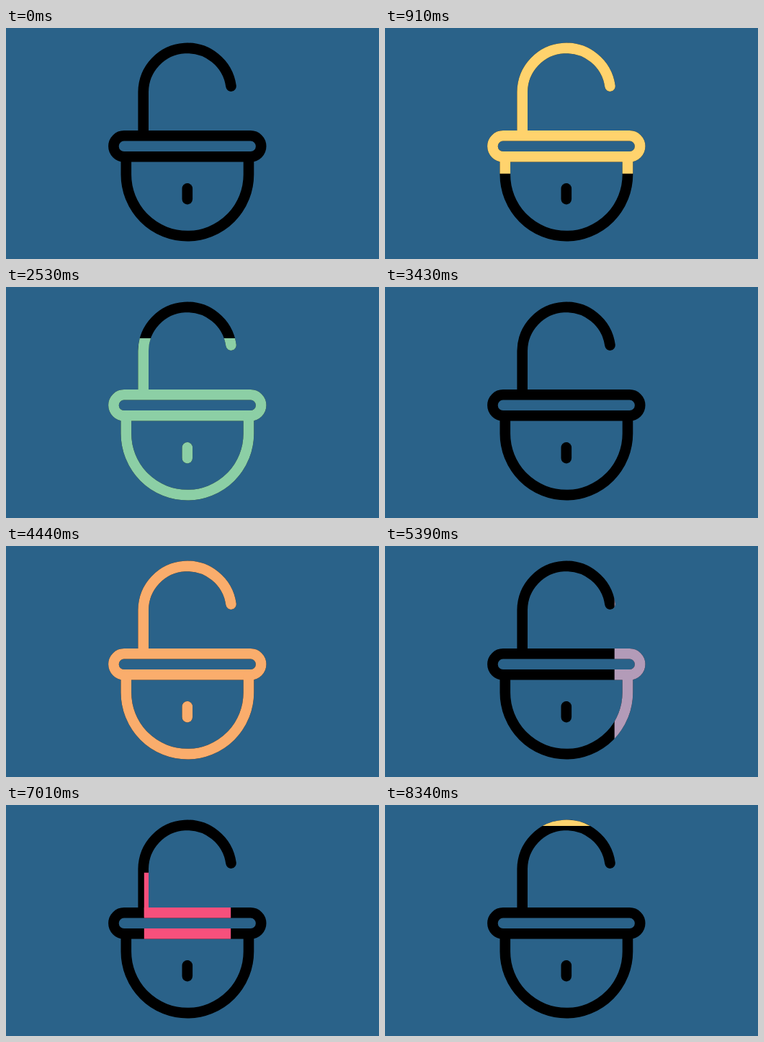
These frames come from a looping animation (518x320 px, 8410 ms). An HTML page:

```html
<!DOCTYPE html>
<html lang="en">
<head>
<meta charset="utf-8">
<title>Padlock colour wipes</title>
<style>
  html, body { margin: 0; width: 100%; height: 100%; overflow: hidden; background: #2a6289; }
  svg { display: block; width: 518px; height: 320px; }
  #lock { fill: none; stroke-width: 14.6; stroke-linecap: round; }
</style>
</head>
<body>
<svg viewBox="0 0 518 320">
  <defs>
    <clipPath id="wipe"><rect id="window" width="0" height="0"/></clipPath>
    <g id="lock">
      <path d="M190.7 148V88.4A61.2 61.2 0 0 1 312.5 80.6"/>
      <rect x="149.4" y="149.3" width="204.8" height="29" rx="14.5"/>
      <path d="M166.8 179V203.1A85.1 85.1 0 0 0 337 203.1V179"/>
      <path d="M251.8 222.4V237.1"/>
    </g>
  </defs>
  <use href="#lock" stroke="#000"/>
  <g clip-path="url(#wipe)"><use id="tint" href="#lock"/></g>
</svg>
<script>
  const LOOP = 8410;
  const TICK = 75;
  const DELAY = 57;
  const DURATION = 900;

  // The wipes run inside a square around the lock.
  const LEFT = 102, TOP = 4, SIDE = 300;

  const down = e => [0, 0, 1, e];
  const up = e => [0, 1 - e, 1, e];
  const right = e => [0, 0, e, 1];
  const left = e => [1 - e, 0, e, 1];
  const out = e => [(1 - e) / 2, (1 - e) / 2, e, e];

  const cycles = [
    { start: 280, color: '#ffd36d', shape: down },
    { start: 1850, color: '#8ccfa5', shape: up },
    { start: 3430, color: '#faad6c', shape: right },
    { start: 4990, color: '#b39bb8', shape: left },
    { start: 6560, color: '#f7507c', shape: out },
    { start: 8110, color: '#ffd36d', shape: down }
  ];

  const pane = document.getElementById('window');
  const tint = document.getElementById('tint');
  const ease = p => (1 - Math.cos(Math.PI * Math.min(1, Math.max(0, p)))) / 2;

  function draw(time) {
    const cycle = cycles.filter(c => c.start <= time).pop() || cycles[0];
    // The 5 ms allowance keeps steps aligned with centisecond timing.
    const step = Math.floor((time - cycle.start + 1) / TICK);
    const [x, y, w, h] = cycle.shape(ease((step * TICK - DELAY) / DURATION));
    const box = { x: LEFT + x * SIDE, y: TOP + y * SIDE, width: w * SIDE, height: h * SIDE };
    for (const key in box) pane.setAttribute(key, box[key].toFixed(2));
    tint.setAttribute('stroke', cycle.color);
  }

  const origin = performance.now();
  function frame() {
    draw((performance.now() - origin) % LOOP);
    requestAnimationFrame(frame);
  }
  draw(0);
  requestAnimationFrame(frame);
</script>
</body>
</html>
```
